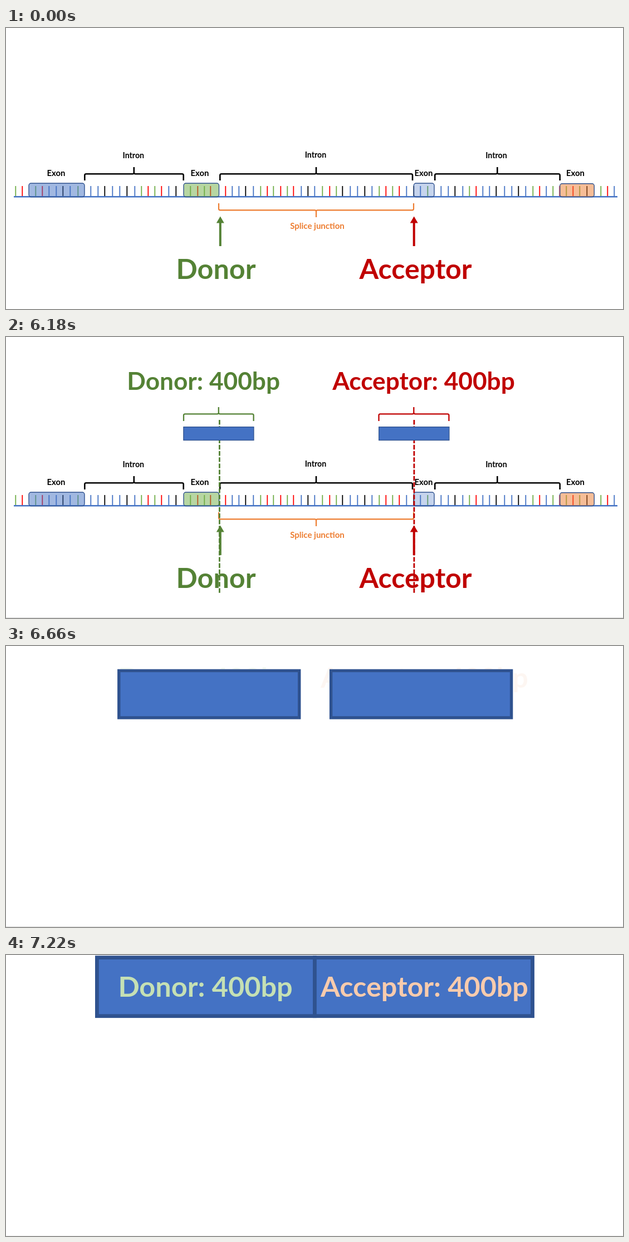
Animation of 1108 by 505 pixels, one loop 8 s. Source, as an HTML page:

```html
<!DOCTYPE html>
<html lang="en">
<head>
<meta charset="utf-8">
<title>Splice junction windows</title>
<style>
  html, body { margin: 0; width: 100%; height: 100%; overflow: hidden; background: #fff; }
  svg { display: block; width: 100vw; height: 100vh; }
  text { font-family: Lato, "Open Sans", sans-serif; font-weight: 700; text-anchor: middle; }
</style>
</head>
<body>
<svg id="stage" viewBox="0 0 1108 505"></svg>
<script>
const LOOP = 8000, DONOR_AT = 1050, ACCEPTOR_AT = 2060;
const MORPH_AT = 6180, MORPH_MS = 1000, END_AT = 7220;
const BLUE = '#4472c4', NAVY = '#2f528f', GREEN = '#548235', RED = '#c00000', ORANGE = '#ed7d31';
const stage = document.getElementById('stage');

function add(parent, tag, attrs, content) {
  const el = document.createElementNS('http://www.w3.org/2000/svg', tag);
  for (const k in attrs) el.setAttribute(k, attrs[k]);
  if (content) el.textContent = content;
  parent.append(el);
  return el;
}

const group = () => add(stage, 'g', {});

function label(parent, content, x, y, size, fill = '#000') {
  add(parent, 'text', { x, y, 'font-size': size, fill }, content);
}

// Curly brace from x1 to x2; its point faces away from the ends.
function brace(parent, x1, x2, tip, yEnd, yLine, yTip, stroke, width) {
  const r = 2.5, s = Math.sign(yEnd - yLine) * r;
  add(parent, 'path', {
    d: `M${x1} ${yEnd}V${yLine + s}Q${x1} ${yLine} ${x1 + r} ${yLine}H${tip - r}` +
       `Q${tip} ${yLine} ${tip} ${yLine - s}V${yTip}V${yLine - s}` +
       `Q${tip} ${yLine} ${tip + r} ${yLine}H${x2 - r}Q${x2} ${yLine} ${x2} ${yLine + s}V${yEnd}`,
    fill: 'none', stroke, 'stroke-width': width
  });
}

function arrow(parent, x, fill) {
  add(parent, 'path', { d: `M${x} 338.5l7 12h-5v41.5h-4v-41.5h-5z`, fill });
}

function dashes(parent, x, stroke) {
  add(parent, 'path', {
    d: `M${x} 149V462`, stroke, 'stroke-width': 2.8, 'stroke-dasharray': '8.4 2.8'
  });
}

// Strand with coloured bases, exons and introns
const scene = group();
const bases = {
  '#70ad47': [17, 53, 129, 243, 267, 331, 356, 457, 480, 505, 568, 593, 670, 694, 757, 832, 946, 982,
              1006, 1030, 1068],
  '#ff0000': [29, 65, 255, 279, 344, 367, 394, 469, 493, 516, 581, 682, 706, 844, 958, 994, 1018, 1080],
  '#000000': [102, 177, 217, 305, 430, 542, 604, 644, 732, 806, 880, 920, 1043],
  [BLUE]: [77, 90, 115, 152, 165, 191, 204, 231, 292, 406, 418, 444, 530, 554, 618, 631, 657, 719, 744,
           781, 794, 820, 856, 868, 895, 908, 933, 970, 1092]
};
for (const stroke in bases) {
  const d = bases[stroke].map(x => `M${x + 0.3} 284V303`).join('');
  add(scene, 'path', { d, stroke, 'stroke-width': 1.8 });
}
add(scene, 'path', { d: 'M14 303.3H1098', stroke: BLUE, 'stroke-width': 2.4 });

function exon(x1, x2, y, fill, alpha, textX) {
  add(scene, 'rect', {
    x: x1, y, width: x2 - x1, height: 303.6 - y, rx: 4,
    fill, 'fill-opacity': alpha, stroke: NAVY, 'stroke-width': 1.4
  });
  label(scene, 'Exon', textX, 265.5, 14.9);
}
exon(41, 141, 279, BLUE, 0.5, 90);
exon(319, 382.5, 279, '#70ad47', 0.5, 348);
exon(732.3, 769, 279, BLUE, 0.3, 750);
exon(994.7, 1056.3, 279.7, ORANGE, 0.5, 1022.5);

function intron(x1, x2, tip, textX, textY) {
  brace(scene, x1, x2, tip, 274, 262.2, 250, '#000', 2.6);
  label(scene, 'Intron', textX, textY, 14.2);
}
intron(141.3, 318.7, 229.8, 228.8, 233.7);
intron(384.3, 730, 557, 556, 232.5);
intron(770.2, 994.7, 882.3, 880.5, 233.7);

brace(scene, 382, 732, 557, 315, 327.3, 340, ORANGE, 2.2);
label(scene, 'Splice junction', 559, 361, 15, ORANGE);
arrow(scene, 384.8, GREEN);
arrow(scene, 732.7, RED);
label(scene, 'Donor', 377, 450.5, 50.3, GREEN);
label(scene, 'Acceptor', 735.5, 450.5, 50, RED);

// Window markers around each site
function marker(title, titleX, x1, x2, tip, lineX, colour) {
  const g = group();
  label(g, title, titleX, 95, 44.2, colour);
  brace(g, x1, x2, tip, 151, 138.3, 126, colour, 2.3);
  dashes(g, lineX, colour);
  return g;
}
const donor = marker('Donor: 400bp', 354.7, 319, 444.6, 381.8, 383.4, GREEN);
const acceptor = marker('Acceptor: 400bp', 750, 669.5, 795.4, 732.3, 732.9, RED);

// The two windows: [left, top, right, bottom, line width] before and after the morph
const boxes = group();
const windows = [
  { at: DONOR_AT, from: [318.9, 161.7, 444.9, 185.5, 1.3], to: [163.4, 4.6, 554.4, 109.7, 6.8] },
  { at: ACCEPTOR_AT, from: [669.7, 161.7, 795.8, 185.5, 1.3], to: [554.4, 4.6, 945.5, 109.7, 6.8] }
];
for (const w of windows) w.el = add(boxes, 'rect', { fill: BLUE, stroke: NAVY });

const captions = group();
label(captions, 'Donor: 400bp', 358, 75, 50.4, '#c5e0b4');
label(captions, 'Acceptor: 400bp', 751.5, 75, 50.3, '#f8cbad');

const edge = add(stage, 'rect', { x: 0, y: 504, width: 1108, height: 1 });

const clamp = v => Math.min(1, Math.max(0, v));
const bez = (s, a, b) => 3 * s * (1 - s) * (1 - s) * a + 3 * s * s * (1 - s) * b + s * s * s;

function ease(x) {
  if (x <= 0 || x >= 1) return clamp(x);
  let lo = 0, hi = 1;
  for (let i = 0; i < 24; i++) {
    const mid = (lo + hi) / 2;
    if (bez(mid, 0.25, 0.3) < x) lo = mid; else hi = mid;
  }
  return bez(lo, 0.05, 1);
}

const show = (el, opacity) => {
  el.setAttribute('opacity', opacity);
  el.setAttribute('display', opacity > 0 ? 'inline' : 'none');
};

function draw(t) {
  const p = ease((t - MORPH_AT) / MORPH_MS);
  const fade = 1 - clamp((t - MORPH_AT) / 220);
  const ended = t >= END_AT;

  show(scene, fade);
  show(donor, t >= DONOR_AT ? fade : 0);
  show(acceptor, t >= ACCEPTOR_AT ? fade : 0);
  show(captions, ended ? 1 : clamp((t - 6600) / 400));

  for (const w of windows) {
    const [l, top, r, b, line] = w.from.map((v, i) => v + (w.to[i] - v) * p);
    const box = { x: l, y: top, width: r - l, height: b - top, 'stroke-width': line };
    for (const k in box) w.el.setAttribute(k, box[k]);
    show(w.el, t >= w.at ? 1 : 0);
  }

  // The windows pass in front of everything only while they move.
  const moving = p > 0 && !ended;
  stage.append(...(moving ? [scene, donor, acceptor, captions, boxes]
                          : [boxes, scene, donor, acceptor, captions]), edge);
  show(edge, t >= MORPH_AT ? 1 : 0);
  edge.setAttribute('fill', ended ? '#f2f2f2' : '#d9d9d9');
}

const start = performance.now();
function tick() {
  draw((performance.now() - start) % LOOP);
  requestAnimationFrame(tick);
}
tick();
</script>
</body>
</html>
```
